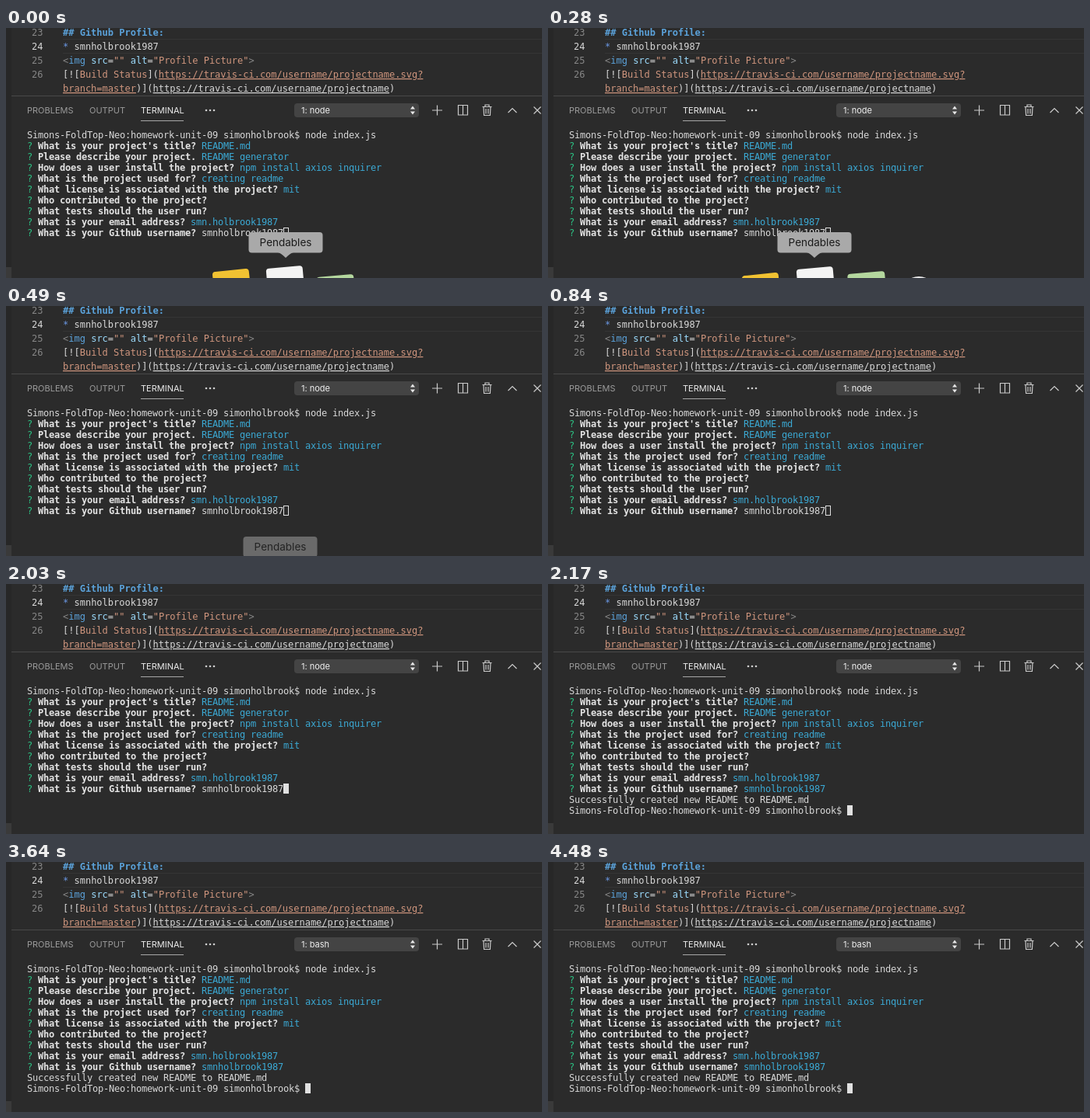
An HTML page for the animation above (4.55 s loop, 688 by 322 pixels).

```html
<!DOCTYPE html>
<html lang="en">
<head>
<meta charset="utf-8">
<title>Terminal</title>
<style>
  html, body { margin: 0; width: 100%; height: 100%; overflow: hidden; background: #2b2b2b; }
  svg { display: block; }
  text { white-space: pre; fill: #d8d8d8; }
  .mono { font: 12px "DejaVu Sans Mono", monospace; }
  .term { letter-spacing: -0.224px; }
  .ui { font: 11px Inter, sans-serif; }
  .b { font-weight: bold; }
  .head { fill: #5ba2da; font-weight: bold; }
  .tag { fill: #5ba2da; }
  .mark { fill: #6c9ae8; }
  .attr { fill: #9cdcfe; }
  .str { fill: #d0967e; }
  .url { text-decoration: underline; }
  .dim { fill: #868686; }
  .ok { fill: #2cc184; }
  .ans { fill: #3ba9d4; }
  .q { fill: #e4e4e4; font-weight: bold; }
  .icon { fill: none; stroke: #cacaca; stroke-width: 1.2; }
</style>
</head>
<body>
<svg id="stage" width="688" height="322" viewBox="0 0 688 322">
  <rect width="688" height="322" fill="#2b2b2b"/>
  <rect width="7" height="322" fill="#272727"/>
  <rect y="308" width="7" height="14" fill="#3a3a3a"/>
  <path d="M73 14.5H688M73 32.5H688" stroke="#353535"/>
  <path d="M7 87.5H688" stroke="#494949"/>
  <g id="words"></g>

  <g class="ui">
    <text x="27" y="110" style="fill:#9b9b9b">PROBLEMS</text>
    <text x="107" y="110" style="fill:#9b9b9b">OUTPUT</text>
    <text x="173" y="110" style="fill:#ececec">TERMINAL</text>
    <path d="M173 119.5H228" stroke="#a8a8a8"/>
    <g fill="#d0d0d0">
      <circle cx="257" cy="106" r="1.3"/><circle cx="262" cy="106" r="1.3"/><circle cx="267" cy="106" r="1.3"/>
    </g>
    <rect x="370" y="97" width="160" height="18" rx="4" fill="#444"/>
    <text id="shell" x="379" y="110" style="fill:#f0f0f0"></text>
    <path d="M519 104.5l3-4 3 4zM519 107.5l3 4 3-4z" fill="#e8e8e8"/>
  </g>
  <g class="icon">
    <path d="M547 106H560M553.500 99.500V112.500"/>
    <path d="M580.500 99.500h12v12.500h-12zM586.500 99.500v12.500"/>
    <path d="M611.500 101.500h12M615 101v-2h5v2M613 102l.6 10.500h7.800l.6-10.500M616 104v6.500M619 104v6.500"/>
    <path d="M644.500 109l5.500-5.500 5.500 5.500"/>
    <path d="M677.500 101.500l9 9M686.500 101.500l-9 9"/>
  </g>

  <rect id="cursor" width="6" height="12" stroke="#e0e0e0"/>

  <g id="dock">
    <g id="icons"></g>
    <g id="tip">
      <path d="M-10 289h20q-4 1-10 7q-6-6-10-7z" fill="#a9a9a9"/>
      <rect x="-47.500" y="263" width="95" height="26.500" rx="4" fill="#a9a9a9"/>
      <text y="281" text-anchor="middle" style="font:13.500px Inter,sans-serif;fill:#1b1b1b">Pendables</text>
    </g>
  </g>
</svg>
<script>
const LOOP = 4550, STEP = 70;
const FOCUS = 1120, ENTER = 2100, SHELL = 2380;
const CELL = 7, LEFT = 27;
const USER = "smnholbrook1987";
const PROMPT = "Simons-FoldTop-Neo:homework-unit-09 simonholbrook$ ";

const $ = id => document.getElementById(id);

function make(tag, attrs, parent) {
  const el = document.createElementNS("http://www.w3.org/2000/svg", tag);
  for (const k in attrs) el.setAttribute(k, attrs[k]);
  return parent.appendChild(el);
}

// parts: [text, class] pairs
function write(x, y, kind, ...parts) {
  const line = make("text", { x, y, class: kind }, $("words"));
  for (const [s, c = ""] of parts) make("tspan", { class: c }, line).textContent = s;
  return line;
}

const code = [
  [["## Github Profile:", "head"]],
  [["*", "mark"], [" " + USER]],
  [["<", "dim"], ["img", "tag"], [" "], ["src", "attr"], ["="], ['""', "str"], [" "],
   ["alt", "attr"], ["="], ['"Profile Picture"', "str"], [">", "dim"]],
  [["[!["], ["Build Status", "str"], ["]("], ["https://travis-ci.com/username/projectname.svg?", "str url"]],
  [["branch=master", "str url"], [")]("], ["https://travis-ci.com/username/projectname", "url"], [")"]]
];
code.forEach((parts, i) => {
  const y = 10 + 18 * i;
  if (i < 4) write(33, y, "mono", [String(23 + i), i === 1 ? "" : "dim"]);
  write(73, y, "mono", ...parts);
});

const rowY = i => 142 + 14 * i;
const term = (row, ...parts) => write(LEFT, rowY(row), "mono term", ...parts);
const ask = (row, q, a) => term(row, ["?", "ok"], [" " + q + " ", "q"], [a, "ans"]);

term(0, [PROMPT + "node index.js"]);
[
  ["What is your project's title?", "README.md"],
  ["Please describe your project.", "README generator"],
  ["How does a user install the project?", "npm install axios inquirer"],
  ["What is the project used for?", "creating readme"],
  ["What license is associated with the project?", "mit"],
  ["Who contributed to the project?", ""],
  ["What tests should the user run?", ""],
  ["What is your email address?", "smn.holbrook1987"]
].forEach(([q, a], i) => ask(i + 1, q, a));
const reply = ask(9, "What is your Github username?", USER).lastChild;
const output = [
  term(10, ["Successfully created new README to README.md"]),
  term(11, [PROMPT])
];

// Linear interpolation through [time, value] points
function track(points, t) {
  let i = 1;
  while (i < points.length - 1 && t > points[i][0]) i++;
  const [t0, a] = points[i - 1], [t1, b] = points[i];
  const p = Math.min(1, Math.max(0, (t - t0) / (t1 - t0)));
  return a + (b - a) * p;
}

const mouse = [[0, 359], [280, 342], [490, 352]];
const drop = [[0, 0], [280, 0], [350, 4], [420, 17], [490, 34], [560, 60]];
const fade = [[350, 1], [420, 0.82], [490, 0.5], [560, 0]];

// x offset, top and tilt; pairs run from rest to the end of the sweep
const apps = [
  { x: [-71, -70], top: [312, 317], tilt: -6, size: 47, fill: "#f1c232" },
  { x: [-2, 0], top: [308, 309], tilt: -5, size: 47, fill: "#f3f3f3" },
  { x: [63, 66], top: [319, 315], tilt: -5, size: 48, fill: "#b4d79e" },
  { x: [132, 134], top: [325, 320], round: true, size: 46, fill: "#e9e9e9" }
];
for (const a of apps) {
  a.el = a.round
    ? make("circle", { cy: a.size / 2, r: a.size / 2, fill: a.fill }, $("icons"))
    : make("rect", { x: -a.size / 2, width: a.size, height: a.size, rx: 4, fill: a.fill }, $("icons"));
}

function draw(t) {
  const done = t >= ENTER;
  reply.setAttribute("class", done ? "ans" : "");
  for (const line of output) line.style.display = done ? "" : "none";
  $("shell").textContent = t < SHELL ? "1: node" : "1: bash";

  const col = done ? PROMPT.length : 47;
  $("cursor").setAttribute("x", LEFT + CELL * col + 0.5);
  $("cursor").setAttribute("y", rowY(done ? 11 : 9) - 10.5);
  $("cursor").setAttribute("fill", t < FOCUS ? "none" : "#e0e0e0");

  $("dock").style.display = t < 560 ? "" : "none";
  const x = track(mouse, t), y = track(drop, t);
  $("tip").setAttribute("transform", `translate(${x} ${y})`);
  $("tip").setAttribute("opacity", track(fade, t));
  for (const a of apps) {
    const at = pair => track([[0, pair[0]], [280, pair[1]]], t);
    a.el.setAttribute("transform", `translate(${x + at(a.x)} ${at(a.top) + y}) rotate(${a.tilt || 0})`);
  }
}

const start = performance.now();
function tick() {
  const t = (performance.now() - start) % LOOP;
  draw(Math.floor(t / STEP) * STEP);
  requestAnimationFrame(tick);
}
tick();
</script>
</body>
</html>
```
